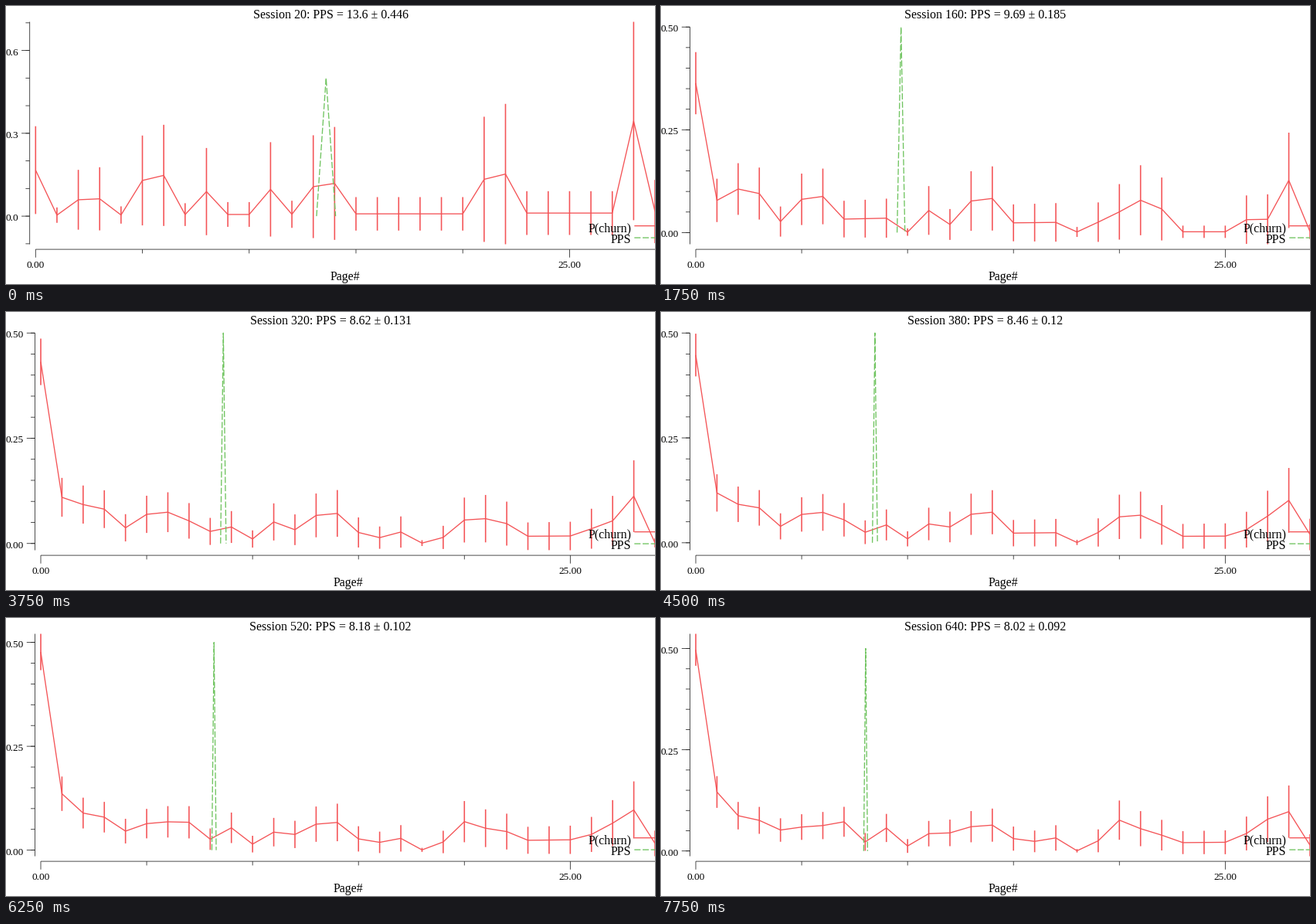
A matplotlib script for the animation above (8000 ms loop, 840 by 360 pixels).

```python
import numpy as np
import matplotlib.pyplot as plt
from matplotlib.animation import FuncAnimation

W, H, DPI = 840, 360, 80
PX = 72 / DPI                       # points per pixel
FRAMES, INTERVAL = 32, 250
STEP = 20                           # sessions added per frame
RED, GREEN, AXIS = "#f45457", "#70c460", "#222222"
TOP, BOTTOM, LABEL_TOP = 20.5, 308.5, 27.2
X_AXIS = 315.1

# Pages where the first visitors left, and exits per page at the end.
FIRST_EXITS = [0, 0, 0, 2, 3, 5, 5, 6, 6, 8, 11, 13, 14, 21, 22, 28, 28]
LAST = np.array([318, 47, 24, 19, 12, 13, 13, 14, 4, 10, 2, 7, 7, 9, 9,
                 4, 3, 4, 0, 3, 9, 6, 4, 2, 2, 2, 4, 7, 8, 1])
PAGES = np.arange(len(LAST))
FIRST = np.bincount(FIRST_EXITS, minlength=len(LAST))
PRIOR = np.where(PAGES == 0, 0.5, 1 / 15)
# Pages with early exits gain quickly at first, the others catch up later.
PACE = np.where((FIRST > 0) & (PAGES > 0), 0.65, 1.17)

plt.rcParams["font.family"] = "Liberation Serif"
plt.rcParams["lines.scale_dashes"] = False


def posterior(session):
    """Mean and two deviations of the Beta estimate for every page."""
    t = (session - STEP) / (STEP * (FRAMES - 1))
    lost = np.round(FIRST + (LAST - FIRST) * t ** PACE)
    seen = session + 1 - np.concatenate(([0], np.cumsum(lost)[:-1]))
    mean = (lost + PRIOR) / seen
    return mean, 2 * np.sqrt(mean * (1 - mean) / (seen + 1))


def pages_per_session(session):
    mean = np.interp(np.log(session), np.log([20, 160, 240, 320, 440, 520, 640]),
                     [13.6, 9.69, 9.15, 8.62, 8.32, 8.18, 8.02])
    spread = np.interp(session, [20, 160, 640], [1.995, 2.341, 2.3274])
    return mean, spread / np.sqrt(session)


def multiples(step, lo, hi):
    return step * np.arange(np.ceil(lo / step), np.floor(hi / step) + 1)


fig = plt.figure(figsize=(W / DPI, H / DPI), dpi=DPI, facecolor="white")
ax = fig.add_axes([0, 0, 1, 1])


def line(x, y, color=AXIS, width=0.8, **kw):
    ax.plot(x, y, color=color, lw=width * PX, solid_capstyle="butt",
            snap=False, **kw)


def dashed(x, y):
    line(x, y, GREEN, 1.33, linestyle=(0, (8 * PX, 2.67 * PX)))


def text(x, y, s, size=16, ha="center"):
    ax.text(x, y, s, fontsize=size * PX, ha=ha, va="baseline", zorder=5)


def draw(frame):
    ax.clear()
    ax.set(xlim=(0, W), ylim=(H, 0))
    ax.axis("off")

    session = STEP * (frame + 1)
    mean, err = posterior(session)
    est, dev = pages_per_session(session)
    lo, hi = (mean - err).min(), max(0.5, (mean + err).max())

    major, parts, digits = (0.3, 3, 1) if hi >= 0.6 else (0.25, 5, 2)
    axis_x = 30.7 if digits == 1 else 37.4
    left = axis_x + 7.6

    # Leave room for half of the topmost tick label.
    share = (multiples(major, lo, hi)[-1] - lo) / (hi - lo)
    top = max(TOP, BOTTOM - (BOTTOM - LABEL_TOP) / share)

    def px(page):
        return left + page * (W - left) / PAGES[-1]

    def py(value):
        return BOTTOM - (value - lo) / (hi - lo) * (BOTTOM - top)

    text(W / 2, 15.5, f"Session {session}: PPS = {est:.3g} ± {dev:.3g}")
    text((left + W) / 2, 355, "Page#")

    line([left, W], [X_AXIS] * 2)
    for page in range(0, 30, 5):
        big = page % 25 == 0
        line([px(page)] * 2, [X_AXIS, X_AXIS + (10.6 if big else 5.3)])
        if big:
            text(px(page), 339, f"{page:.2f}", 13.33)

    line([axis_x] * 2, [top, BOTTOM])
    for v in multiples(major / parts, lo, hi):
        line([axis_x - 5.3, axis_x], [py(v)] * 2)
    for v in multiples(major, lo, hi):
        line([axis_x - 10.6, axis_x], [py(v)] * 2)
        text(0, py(v) + 6, f"{abs(v):.{digits}f}", 13.33, "left")

    line(px(PAGES), py(mean), RED, 1.33)
    ax.vlines(px(PAGES), py(mean + err), py(mean - err), color=RED,
              lw=1.6 * PX, snap=False)
    dashed(px(np.array([est - dev, est, est + dev])), py(np.array([0, 0.5, 0])))

    text(809.3, 292.2, "P(churn)", ha="right")
    text(809.3, 307.3, "PPS", ha="right")
    line([813.3, W], [284.7] * 2, RED, 1.33)
    dashed([813.3, W], [300.1] * 2)
    return []


anim = FuncAnimation(fig, draw, frames=FRAMES, interval=INTERVAL,
                     init_func=lambda: draw(0), repeat=True, repeat_delay=0)
plt.show()
```
